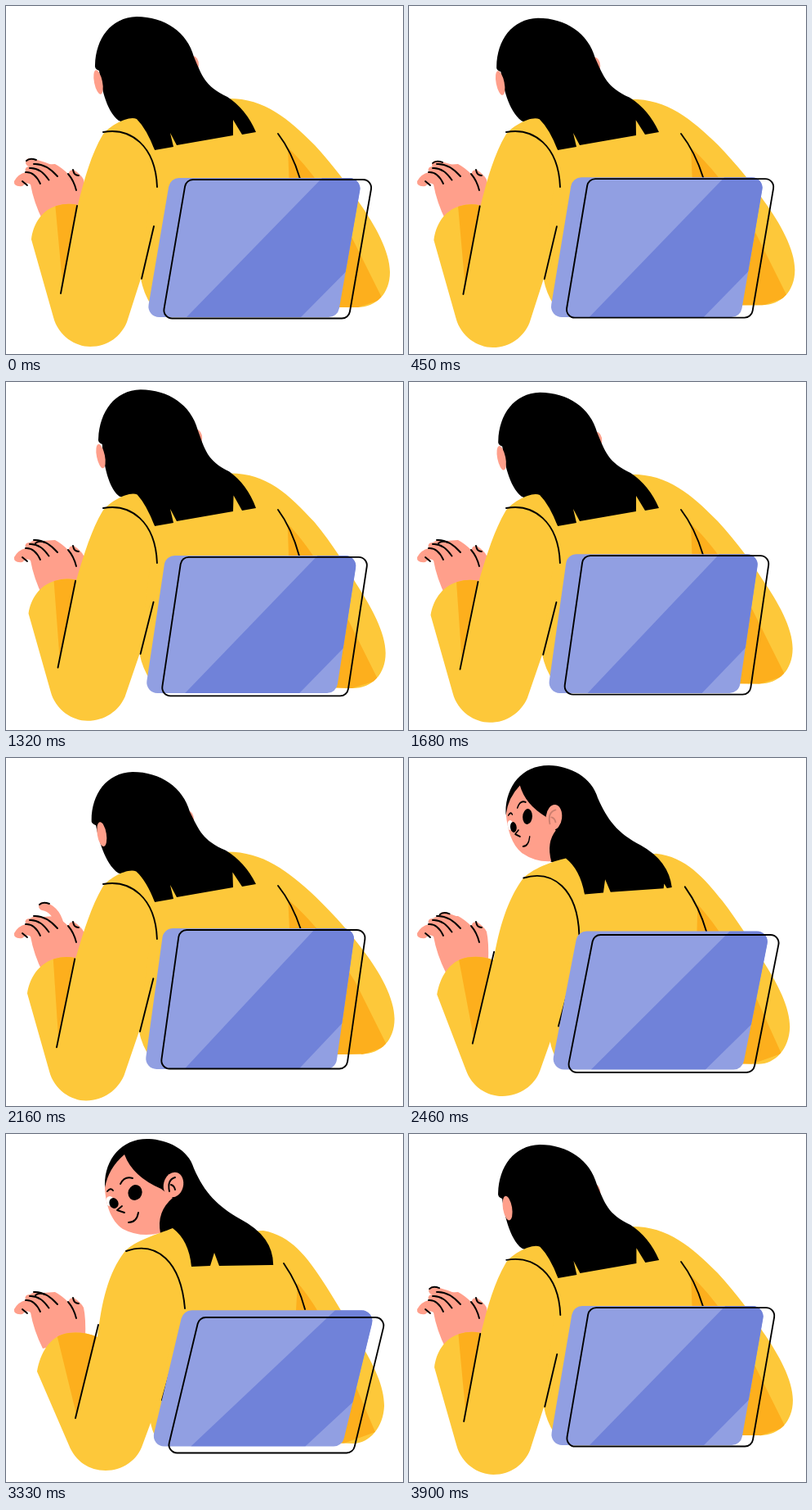
An HTML page with a canvas that plays this animation: 486 px wide and 425 px high, repeating every 3930 ms.

```html
<!DOCTYPE html>
<html lang="en">
<head>
<meta charset="utf-8">
<title>Woman at a laptop</title>
<style>
html, body { margin: 0; width: 486px; height: 425px; overflow: hidden; background: #fff; }
canvas { display: block; }
</style>
</head>
<body>
<canvas id="stage" width="486" height="425"></canvas>
<script>
const ctx = document.getElementById('stage').getContext('2d');
const LOOP = 3930;
const YELLOW = '#fdc83a', ORANGE = '#fdaf1d', SKIN = '#ff9f8b', INK = '#000';
const LIGHT = '#919fe2', BLUE = '#7082d9';

// Each shape has an outline seen from behind and its points with the head turned.
const torso = [
  'M150 142 L270 113 C316 112 345 137 378 170 C402 196 421 222 433 241 C452 268 470 300 470 325 C470 352 452 369 428 368 L178 366 Q168 350 165 333 L150 200Z',
  '200 122 318 118 349 124 369 151 386 177 402 201 419 231 435 257 450 282 463 308 463 332 462 358 445 378 425 378 183 370 178 360 177 352 180 200'
];
const shade = [
  'M345 173 C372 198 400 238 422 280 L461 358 L380 385 L350 300Z',
  '357 182 378 205 402 250 426 303 452 364 380 390 350 300'
];
const arm = [
  'M160 138 C150 133 125 147 118 158 C105 180 96 210 88 243 Q75 240 62 244 C42 250 33 268 31 285 L58 380 C64 403 85 416 103 416 C125 416 141 403 148 386 L165 333 L182 176 Q172 150 160 138Z',
  '207 115 190 122 160 130 148 144 128 170 117 205 112 248 95 241 77 243 53 246 42 268 38 290 77 380 85 400 102 411 122 411 143 411 161 398 167 380 177 353 230 162 227 130 207 115'
];
const cuff = ['M60 240 L88 240 L69 338Z', '61 240 113 240 86 342'];
const creases = [
  'M119 154 C152 148 183 170 185 221 M333 156 Q350 178 360 211 M87 244 L67 351 M181 269 L166 333',
  '150 143 188 130 217 156 219 213 340 158 358 184 366 214 113 233 85 347 209 261 191 325'
];
const hair = [
  'M160 13 C128 14 110 40 109 72 Q108 77 114 79 C116 95 122 128 138 140 L165 150 L182 176 L205 172 L201 155 L209 170 L278 158 L278 139 L289 157 L306 154 Q294 126 271 111 C243 98 240 85 230 62 C222 32 194 13 160 13Z',
  '178 6 145 5 124 30 124 62 124 66 126 72 150 90 180 105 190 120 212 130 230 162 253 161 258 145 264 161 327 160 328 160 328 160 329 160 329 125 290 104 262 88 246 72 233 42 226 18 200 7 178 6'
];
const face = [
  'M112 50 Q110 60 110 72 C112 90 116 105 122 115 Q130 128 136 137 Q128 120 122 110 L114 80 Q111 65 112 50Z',
  '148 25 128 42 124 66 125 85 131 106 146 116 167 127 192 121 187 95 207 78 193 67 158 52 148 25'
];
const features = 'M127 70 Q131 65 134 69 M143 61 Q148 51 158 54 M145 88 L139 93 L148 96 M153 108 Q163 108 165 96';
const palm = 'M45 262 Q34 240 30 218 Q26 214 20 220 Q9 221 10 214 Q15 205 24 203 Q22 196 29 196 Q36 191 45 194 L60 193 Q68 197 77 206 Q76 200 83 200 Q92 206 95 212 Q98 225 97 250Z';

const clamp = x => Math.max(0, Math.min(1, x));
const mix = (a, b, u) => a + (b - a) * u;
const smooth = (t, from, to) => {
  const u = clamp((t - from) / (to - from));
  return u * u * (3 - 2 * u);
};
const pulse = (t, a, b, c, d) => smooth(t, a, b) - smooth(t, c, d);

function poseAt(t) {
  const turn = pulse(t, 2160, 2640, 3400, LOOP);
  const settle = 1 - smooth(t, 2160, 2640);
  const pose = {
    turn,
    sway: 2 * Math.sin(Math.PI * (1700 - t) / 950) * smooth(t, 0, 900) * settle,
    drift: smooth(t, 0, 2100) * settle,
    smile: smooth(t, 2760, 3330) * turn,
    peek: Math.max(turn, .08 * smooth(t, 1900, 2160)),
    open: 1 - pulse(t, 2540, 2650, 2960, 3080),
    curl: 1 - pulse(t, 0, 1100, 3390, LOOP),
    point: pulse(t, 1780, 2160, 2160, 2640)
  };
  pose.lean = 12 * turn + 4 * pose.smile - 8 * pose.drift;
  return pose;
}

// The head tips one way while the arms give the other way.
function warp(x, y, { sway, drift, smile }) {
  const head = clamp((150 - y) / 90);
  const right = clamp((x - 330) / 90) * clamp((y - 140) / 120);
  const left = clamp((190 - x) / 60) * clamp((y - 200) / 80);
  const collar = clamp((200 - y) / 30) * clamp((335 - x) / 10);
  return [
    x + sway * (2.5 * head - 2.8 * right) - 5 * drift * left - 3 * smile * collar,
    y + sway * (3.2 * right - 2 * head - 1.2 * left)
  ];
}

const pairs = text => text.match(/[\d.]+ [\d.]+/g).map(p => p.split(' ').map(Number));

function shape([outline, turned = outline], pose) {
  const from = pairs(outline), to = pairs(turned);
  let i = 0;
  return new Path2D(outline.replace(/[\d.]+ [\d.]+/g, () => {
    const a = from[i], b = to[i++];
    return warp(mix(a[0], b[0], pose.turn), mix(a[1], b[1], pose.turn), pose).join(' ');
  }));
}

function fill(path, color) {
  ctx.fillStyle = color;
  ctx.fill(path);
}

const line = d => ctx.stroke(new Path2D(d));

function inside(path, draw) {
  ctx.save();
  ctx.clip(path);
  draw();
  ctx.restore();
}

function oval(x, y, rx, ry, color, tilt = 0) {
  const p = new Path2D();
  p.ellipse(x, y, rx, ry, tilt, 0, 7);
  fill(p, color);
}

function panel(bx, by, tx, ty, bottom, top, r) {
  const p = new Path2D();
  p.moveTo(tx + top / 2, ty);
  p.arcTo(tx + top, ty, bx + bottom, by, r);
  p.arcTo(bx + bottom, by, bx, by, r);
  p.arcTo(bx, by, tx, ty, r);
  p.arcTo(tx, ty, tx + top, ty, r);
  p.closePath();
  return p;
}

function drawLaptop({ lean, sway }) {
  const rise = Math.max(lean, 0);
  const bx = 172 + lean / 3, by = 380 + rise / 10;
  const tx = 201 + lean, ty = 210 + rise / 3 + sway;
  const body = panel(bx, by, tx, ty, 234, 235, 13);
  fill(body, LIGHT);
  const rx = mix(tx, bx, .67) + 235, ry = mix(ty, by, .67);
  inside(body, () => fill(new Path2D(
    `M${tx + 186} ${ty} H${tx + 235} L${rx} ${ry} L${bx + 189} ${by} H${bx + 49}Z`), BLUE));
  ctx.stroke(panel(191.5 + lean / 3, 381.5 + rise / 2 + sway, 220.5 + lean, 212 + rise * .75 + sway, 228, 228.5, 10));
}

function drawHand({ curl, point }) {
  fill(new Path2D(palm), SKIN);
  const x = 40 - 11 * curl + 5 * point, y = 199 - 8 * curl - 18 * point;
  ctx.save();
  ctx.strokeStyle = SKIN;
  ctx.lineWidth = 10;
  line(`M${x} ${y} Q${x + 16} ${y + 3} 66 204`);
  ctx.restore();
  line(`M${x - 4} ${y - 2} Q${x} ${y - 6} ${x + 8} ${y - 3}`);
  for (let i = 0; i < 3; i++) {
    line(`M${24 + 5 * i} ${203 - 5 * i} Q${35 + 7 * i} ${202 - 5 * i} ${42 + 10.5 * i} ${217 - 4.5 * i}`);
  }
  line('M20 214 L26 219 M76 205 Q83 213 86 225 M82 200 Q83 207 89 207');
}

function drawFace(pose) {
  const { turn, smile, open } = pose;
  if (turn < .03) return;
  const skin = shape([face[0], face[1]], pose);
  fill(skin, SKIN);
  inside(skin, () => {
    ctx.translate(124 - 14 * (1 - turn), 0);
    ctx.scale(turn, 1);
    ctx.translate(-124 - 3 * smile, 0);
    line(features);
    oval(130, 82, 5, 6, '#fff');
    oval(136 - smile, 84.5, 5.5, 6.5, INK, -.4);
    if (open > .15) oval(161, 71.5, 8.5, 9.5 * open, INK, .35);
    else line('M154 80 Q158 68 171 65');
  });
}

function drawEar(pose) {
  const u = pose.peek;
  const [x, y] = warp(mix(113, 208, u), mix(93, 62, u), pose);
  oval(x, y, mix(5, 12, u), mix(15, 15.5, u), SKIN, mix(-.2, .25, u));
  ctx.save();
  ctx.globalAlpha = smooth(u, .6, .9);
  ctx.translate(x - 208, y - 62);
  line('M203 70 Q200 56 210 53 M205 62 Q209 63 210 68');
  ctx.restore();
}

function draw(t) {
  const pose = poseAt(t);
  ctx.fillStyle = '#fff';
  ctx.fillRect(0, 0, 486, 425);
  ctx.strokeStyle = INK;
  ctx.lineWidth = 1.9;
  ctx.lineCap = ctx.lineJoin = 'round';

  const back = shape(torso, pose);
  fill(back, YELLOW);
  inside(back, () => fill(shape(shade, pose), ORANGE));
  drawHand(pose);

  const [earX, earY] = warp(229 - 20 * pose.peek, 72, pose);
  oval(earX, earY, 7, 11, SKIN);
  fill(shape(hair, pose), INK);
  drawFace(pose);
  drawEar(pose);

  const sleeve = shape(arm, pose);
  fill(sleeve, YELLOW);
  inside(sleeve, () => fill(shape(cuff, pose), ORANGE));
  ctx.stroke(shape(creases, pose));
  drawLaptop(pose);
}

const start = performance.now();
function tick() {
  draw((performance.now() - start) % LOOP);
  requestAnimationFrame(tick);
}
tick();
</script>
</body>
</html>
```
